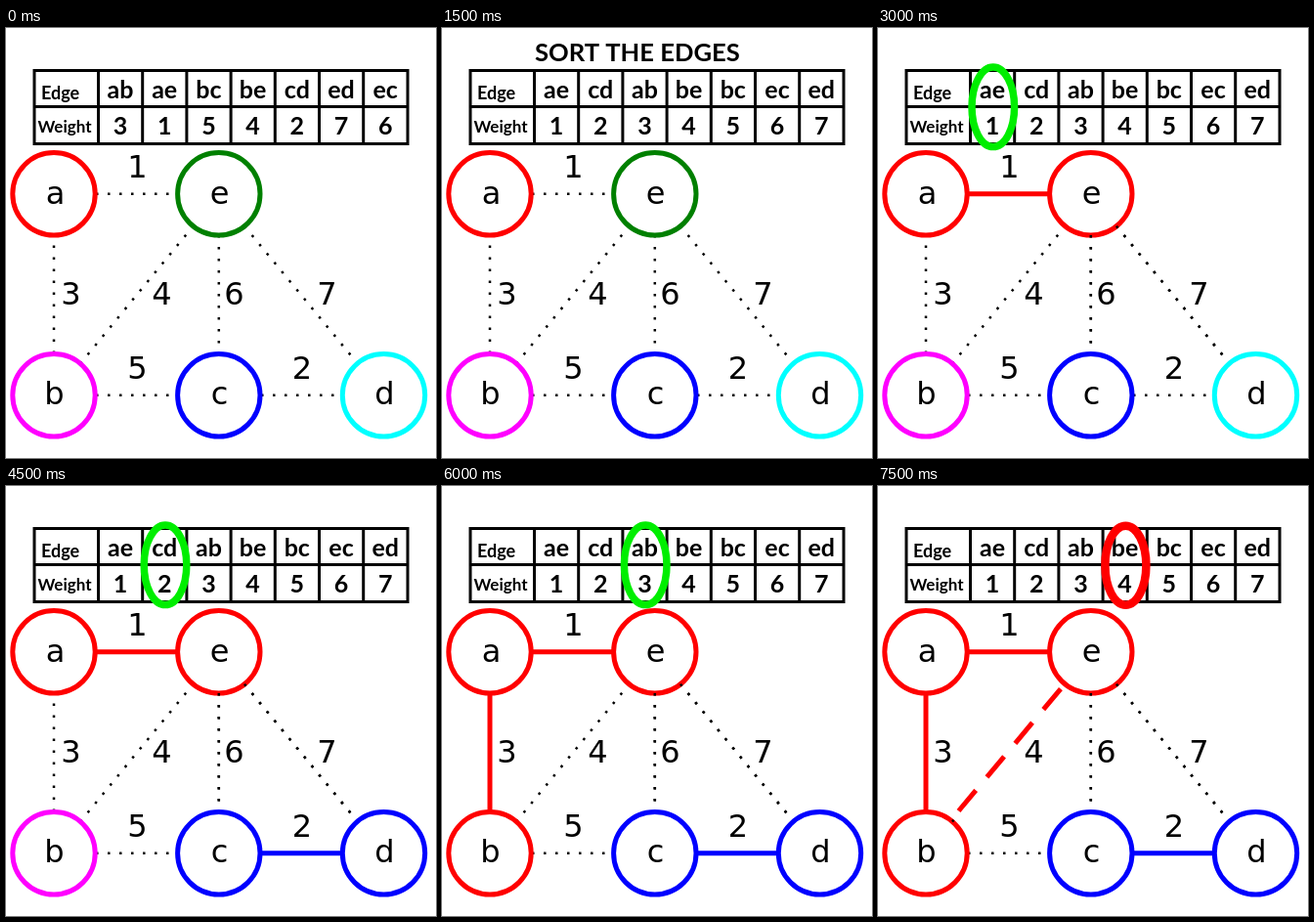
Animation, 440 px wide and 440 px high, one loop 8000 ms. Source, as an HTML page with a canvas:

```html
<!DOCTYPE html>
<html lang="en">
<head>
<meta charset="utf-8">
<title>Sorting edges for a spanning tree</title>
<style>
  html, body { margin: 0; width: 100%; height: 100%; overflow: hidden; background: #fff; }
  canvas { display: block; width: 440px; height: 440px; }
</style>
</head>
<body>
<canvas id="stage" width="440" height="440"></canvas>
<script>
const ctx = document.getElementById('stage').getContext('2d');
const LOOP = 8000, STEP = 1500;
const TABLE = 'Lato, Carlito, sans-serif';
const GRAPH = '"DejaVu Sans", sans-serif';
const RED = '#f00', BLUE = '#00f', LIME = '#00ee00';

const unsorted = { ab: 3, ae: 1, bc: 5, be: 4, cd: 2, ed: 7, ec: 6 };
const sorted = Object.fromEntries(Object.entries(unsorted).sort((p, q) => p[1] - q[1]));

// Centre, colour and label position of each node
const nodes = {
  a: { x: 49, y: 169.8, color: RED, tx: 50.5, ty: 179.5 },
  e: { x: 217.8, y: 169.8, color: '#008000', tx: 218.5, ty: 179.5 },
  b: { x: 49, y: 375.8, color: '#f0f', tx: 49.5, ty: 385 },
  c: { x: 217.8, y: 375.8, color: BLUE, tx: 218.5, ty: 385 },
  d: { x: 386.5, y: 375.8, color: '#0ff', tx: 387.5, ty: 385 }
};

// Ends of the edges and positions of their weights
const edges = {
  ae: { line: [92, 169.8, 175, 169.8], label: [134.5, 153] },
  ab: { line: [49, 333, 49, 213], label: [66.5, 282.5] },
  be: { line: [76, 343.5, 188, 207], label: [159.5, 282.5] },
  ec: { line: [217.8, 212, 217.8, 332], label: [233.5, 282.5] },
  ed: { line: [244, 202.7, 357, 340], label: [328.5, 282.5] },
  bc: { line: [92, 375.8, 175, 375.8], label: [134.5, 359] },
  cd: { line: [261, 375.8, 344, 375.8], label: [303, 359] }
};

function text(str, x, y, font, align = 'center') {
  ctx.font = font;
  ctx.textAlign = align;
  ctx.fillStyle = '#000';
  ctx.fillText(str, x, y);
}

function line(x1, y1, x2, y2, color, width, dash = []) {
  ctx.strokeStyle = color;
  ctx.lineWidth = width;
  ctx.setLineDash(dash);
  ctx.beginPath();
  ctx.moveTo(x1, y1);
  ctx.lineTo(x2, y2);
  ctx.stroke();
  ctx.setLineDash([]);
}

function ring(x, y, rx, ry, color, width) {
  ctx.strokeStyle = color;
  ctx.lineWidth = width;
  ctx.beginPath();
  ctx.ellipse(x, y, rx, ry, 0, 0, Math.PI * 2);
  ctx.stroke();
}

const columnX = i => 117 + 45.2 * i;

function drawTable(data) {
  ctx.strokeStyle = '#000';
  ctx.lineWidth = 3;
  ctx.strokeRect(29, 43.5, 382, 75);
  line(29, 80.5, 411, 80.5, '#000', 3);
  for (let i = 0; i < 7; i++) {
    const x = 94.5 + 45.2 * i;
    line(x, 43, x, 118, '#000', 3);
  }
  text('Edge', 36, 72.8, `bold 18px ${TABLE}`, 'left');
  text('Weight', 32.5, 107, `bold 17px ${TABLE}`, 'left');
  Object.entries(data).forEach(([name, weight], i) => {
    text(name, columnX(i), 72, `bold 25px ${TABLE}`);
    text(weight, columnX(i), 109, `bold 25px ${TABLE}`);
  });
}

function drawDotted(name) {
  line(...edges[name].line, '#000', 2.5, [2.5, 9.5]);
}

function drawGraph(step) {
  const chosen = {};
  const paint = Object.fromEntries(Object.keys(nodes).map(k => [k, nodes[k].color]));
  if (step >= 2) { chosen.ae = RED; paint.e = RED; }
  if (step >= 3) { chosen.cd = BLUE; paint.d = BLUE; }
  if (step >= 4) { chosen.ab = RED; paint.b = RED; }
  const rejected = step >= 5;

  for (const name in edges) {
    if (chosen[name]) line(...edges[name].line, chosen[name], 5);
    else if (!(rejected && name === 'be')) drawDotted(name);
  }
  for (const k in nodes) {
    const n = nodes[k];
    ring(n.x, n.y, 42.2, 42.2, paint[k], 5);
    text(k, n.tx, n.ty, `32px ${GRAPH}`);
  }
  if (step >= 2) {
    drawDotted('ed');
    drawDotted('ec');
  }
  if (rejected) {
    line(76, 343.5, 77.5, 341.7, '#000', 2.5);
    line(82.5, 332.5, 187, 207.5, RED, 5, [27.5, 17.6]);
  }
  for (const name in edges) {
    text(unsorted[name], ...edges[name].label, `32px ${GRAPH}`);
  }
}

function draw(now) {
  const step = Math.floor((now % LOOP) / STEP);
  ctx.fillStyle = '#fff';
  ctx.fillRect(0, 0, 440, 440);
  if (step === 1) text('SORT THE EDGES', 95, 33.5, `bold 25.6px ${TABLE}`, 'left');
  drawTable(step ? sorted : unsorted);
  drawGraph(step);
  if (step >= 2) {
    const x = columnX(step - 2) + 0.8;
    if (step === 5) ring(x, 81.2, 21, 40.5, RED, 8.5);
    else ring(x, 80.8, 21.8, 40.8, LIME, 7.5);
  }
}

let start;
function tick(now) {
  start ??= now;
  draw(now - start);
  requestAnimationFrame(tick);
}
draw(0);
requestAnimationFrame(tick);
</script>
</body>
</html>
```
